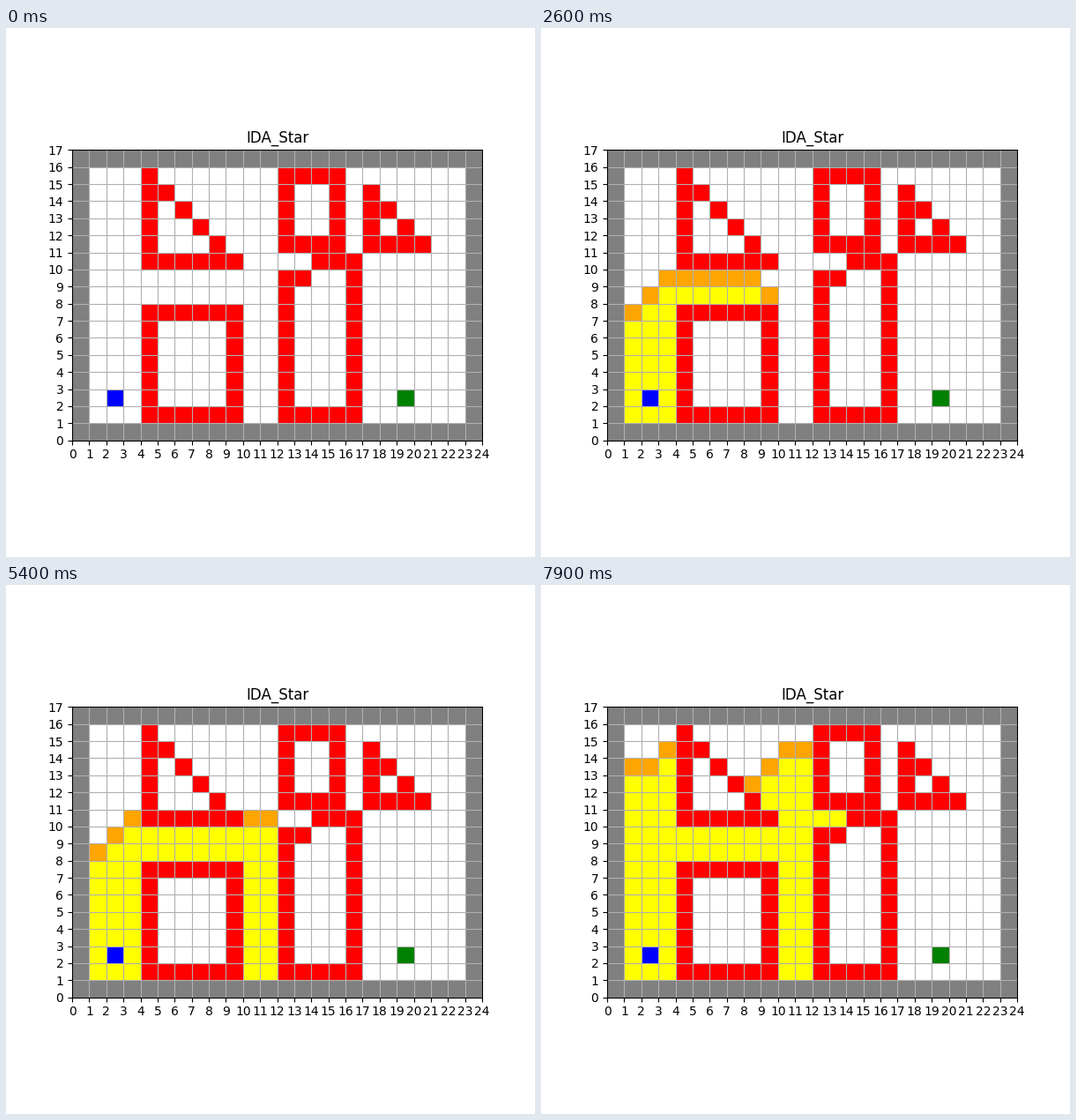
Recreate the animation shown at these times as a matplotlib script. Size 600x600 px, loop 8 s.

```python
import numpy as np
import matplotlib.pyplot as plt
from matplotlib.animation import FuncAnimation
from matplotlib.colors import ListedColormap

W, H = 24, 17
START, GOAL = (2, 2), (19, 2)
STEPS, INTERVAL = 80, 100
FREE, BORDER, WALL, SOURCE, TARGET, CLOSED, OPEN = range(7)
COLORS = ["white", "gray", "red", "blue", "green", "yellow", "orange"]


def build_map():
    grid = np.full((H, W), BORDER)
    grid[1:-1, 1:-1] = FREE

    def fill(x0, y0, x1, y1):
        grid[y0:y1 + 1, x0:x1 + 1] = WALL

    def box(x0, y0, x1, y1):
        fill(x0, y0, x1, y1)
        grid[y0 + 1:y1, x0 + 1:x1] = FREE

    def triangle(x, y, size):
        fill(x, y, x, y + size - 1)
        fill(x, y, x + size - 1, y)
        for i in range(size):
            grid[y + size - 1 - i, x + i] = WALL

    box(4, 1, 9, 7)
    triangle(4, 10, 6)
    box(12, 11, 15, 15)
    triangle(17, 11, 4)
    fill(12, 1, 12, 9)
    fill(12, 1, 16, 1)
    fill(16, 1, 16, 10)
    fill(14, 10, 16, 10)
    fill(12, 9, 13, 9)
    return grid


def search(grid, steps):
    """Best-first search by (f, h, cell); returns the grid after each step."""
    cost, closed = {START: 0}, set()
    opened = {START}

    def priority(cell):
        h = abs(cell[0] - GOAL[0]) + abs(cell[1] - GOAL[1])
        return cost[cell] + h, h, cell

    def snapshot():
        view = grid.copy()
        for cells, state in ((closed, CLOSED), (opened, OPEN)):
            for x, y in cells:
                view[y, x] = state
        view[START[::-1]] = SOURCE
        view[GOAL[::-1]] = TARGET
        return view

    views = [snapshot()]
    for _ in range(steps - 1):
        cell = min(opened, key=priority)
        opened.remove(cell)
        closed.add(cell)
        x, y = cell
        for nxt in ((x + 1, y), (x - 1, y), (x, y + 1), (x, y - 1)):
            if grid[nxt[::-1]] != FREE or nxt in closed:
                continue
            cost[nxt] = min(cost.get(nxt, W * H), cost[cell] + 1)
            opened.add(nxt)
        views.append(snapshot())
    return views


views = search(build_map(), STEPS)

fig, ax = plt.subplots(figsize=(6, 6), dpi=100)
mesh = ax.pcolormesh(views[0], cmap=ListedColormap(COLORS),
                     vmin=-0.5, vmax=len(COLORS) - 0.5)
ax.set_aspect("equal")
ax.set_xlim(0, W)
ax.set_ylim(0, H)
ax.set_xticks(range(W + 1))
ax.set_yticks(range(H + 1))
ax.grid(True)
ax.set_title("IDA_Star")


def draw(i):
    mesh.set_array(views[i % STEPS])
    return [mesh]


anim = FuncAnimation(fig, draw, frames=STEPS, interval=INTERVAL,
                     repeat=True, repeat_delay=0)
plt.show()
```
